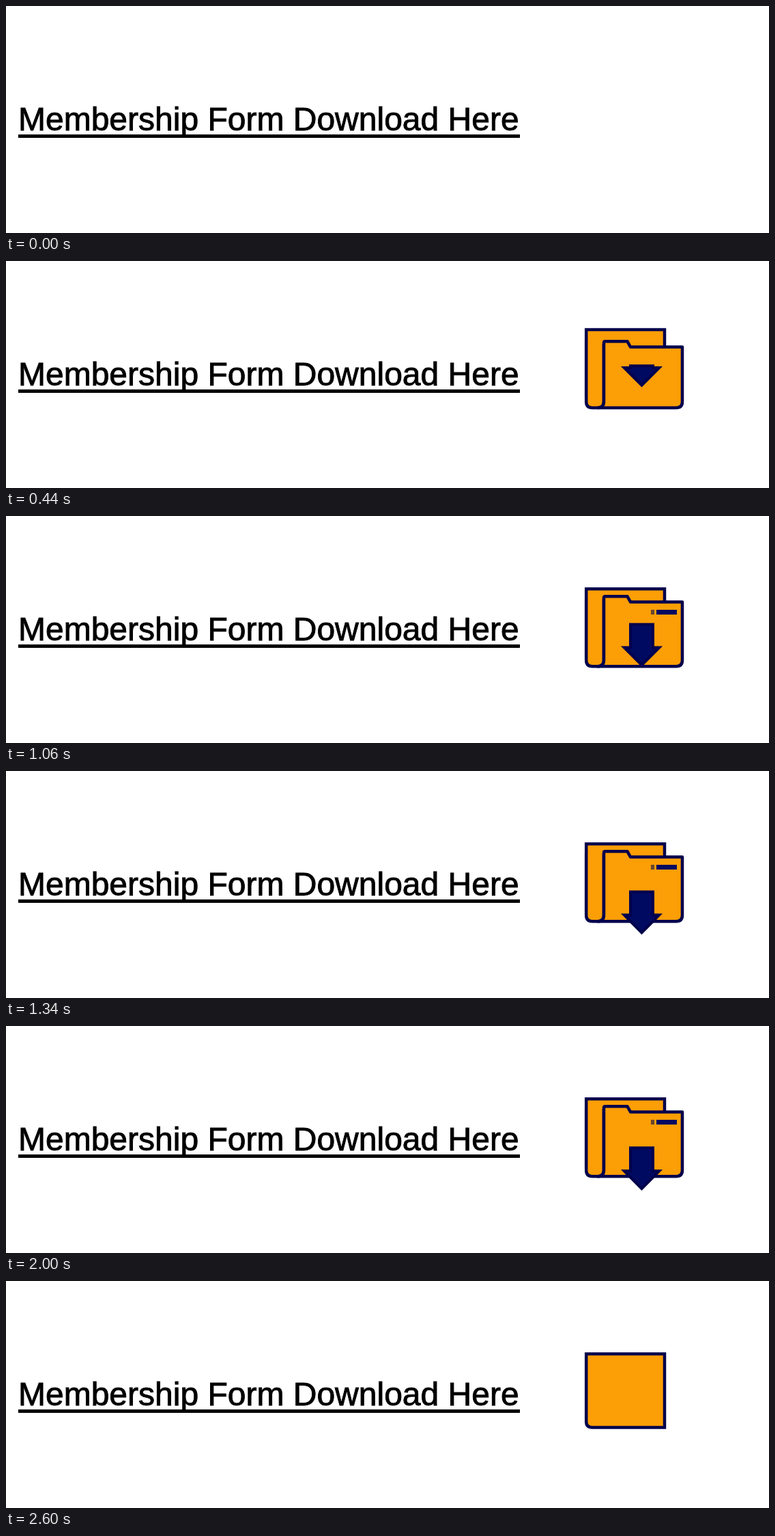
An HTML page for the animation above (2620 ms loop, 1118 by 334 pixels).

```html
<!DOCTYPE html>
<html lang="en">
<head>
<meta charset="utf-8">
<title>Membership form</title>
<style>
  html, body { margin: 0; width: 100%; height: 100%; overflow: hidden; background: #fff; }
  svg { display: block; width: 1118px; height: 334px; }
  text { font: 48px "Liberation Sans", Arial, sans-serif; font-kerning: none; stroke: #000; stroke-width: .9; }
  .line { fill: #fc9e05; stroke: #00004c; stroke-width: 4.5; vector-effect: non-scaling-stroke; }
  #arrow { fill: #000a60; stroke: #00004c; stroke-width: 4; stroke-miterlimit: 8; }
</style>
</head>
<body>
<svg viewBox="0 0 1118 334">
  <text x="18" y="183">Membership Form Download Here</text>
  <rect x="18" y="189" width="735" height="5"/>
  <path id="back" class="line" d="M850.2 107.2H965V215.4H859Q850.2 215.4 850.2 207Z"/>
  <g id="front">
    <path id="spine" class="line"/>
    <path id="cover" class="line" stroke-linejoin="round"/>
    <rect id="dot" x="945" y="138" height="7" fill="#6a4630"/>
    <rect id="bar" x="953" y="138" height="7" fill="#000a60"/>
  </g>
  <path id="arrow"/>
</svg>
<script>
const LOOP = 2620, STEP = 20;
const $ = id => document.getElementById(id);

// Smooth rise from 0 to 1 between times a and b.
function ease(t, a, b) {
  const p = Math.min(1, Math.max(0, (t - a) / (b - a)));
  return (1 - Math.cos(Math.PI * p)) / 2;
}

const set = (id, attrs) => {
  for (const k in attrs) $(id).setAttribute(k, attrs[k]);
};
const show = (id, on) => set(id, { visibility: on ? "visible" : "hidden" });

function drawFolder(t) {
  const left = Math.min(1, Math.max(0, 1 - (t - 20) / 520));
  const drop = -51 * left ** 1.28;
  show("back", t >= 20);
  set("back", { transform: `translate(0 ${drop})` });

  // The cover opens from its left edge, a little too far at first.
  const extra = .035 * (ease(t, 250, 330) - ease(t, 340, 430));
  const open = ease(t, 190, 330) - ease(t, 2430, 2590) + extra;
  const base = 221.2 + drop * .85, bend = base - 9;
  show("front", open > .01);
  set("front", { transform: `translate(850 0) scale(${Math.max(open, .01)} 1) translate(-850 0)` });
  set("spine", { d: `M850.2 ${122 + drop}V${bend}Q850.2 ${base} 859 ${base}H868Q876 ${base} 876 ${bend}V122` });
  set("cover", { d: `M867 ${base}Q876 ${base} 876 ${bend}V120.5Q876 118.3 878 118.3H910.5L915 126.5H991V${bend}Q991 ${base} 982 ${base}Z` });

  const bars = ease(t, 550, 790) - ease(t, 2140, 2490);
  set("dot", { width: 5 * bars });
  set("bar", { width: 30 * bars });
}

function drawArrow(t) {
  const size = ease(t, 300, 420) - ease(t, 2440, 2570);
  const enter = ease(t, 430, 540), leave = ease(t, 2120, 2400);
  const bob = (1 + Math.cos(2 * Math.PI * (t - 775) / 630)) / 2;
  const head = 156 + 37 * enter + 21 * bob - 24 * leave;
  const top = head - 2 - 32 * (enter - leave);
  show("arrow", size > .01);
  set("arrow", {
    d: `M915 ${top}H948V${head}H957.3L931.5 ${head + 26}L905.7 ${head}H915Z`,
    transform: `translate(931.5 ${head}) scale(${size}) translate(-931.5 ${-head})`
  });
}

function draw(t) {
  drawFolder(t);
  drawArrow(t);
}

const start = performance.now();
function tick(now) {
  const t = Math.max(0, now - start) % LOOP;
  draw(Math.floor(t / STEP) * STEP);
  requestAnimationFrame(tick);
}
draw(0);
requestAnimationFrame(tick);
</script>
</body>
</html>
```
